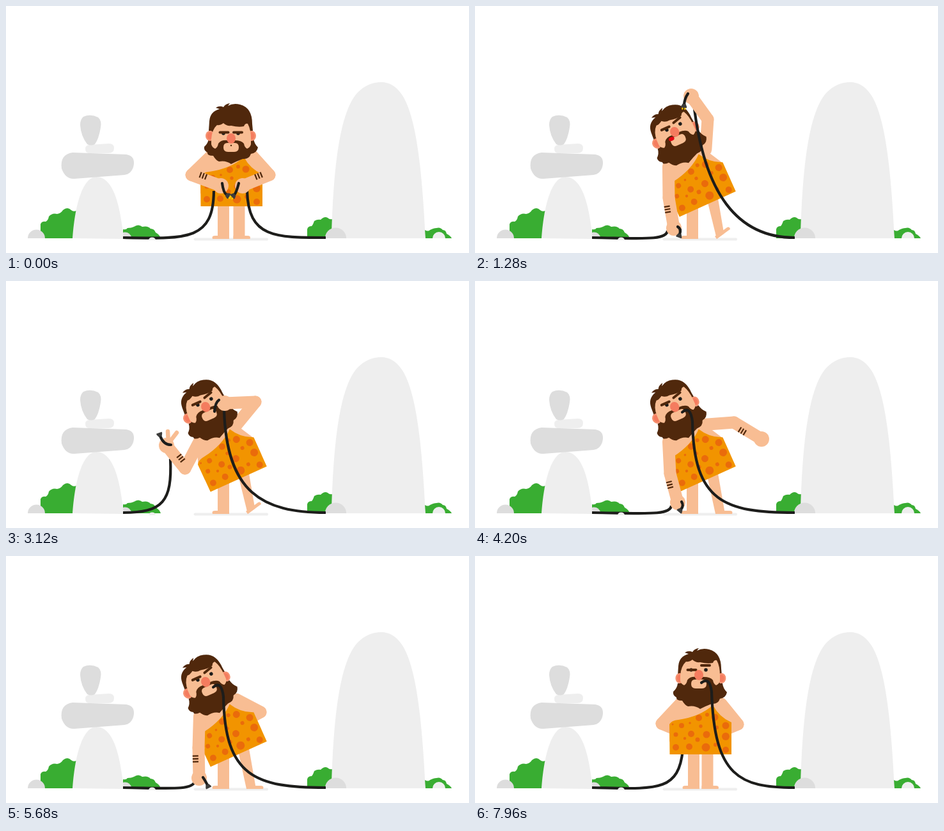
Animation of 724x386 px, one loop 8 s. Source, as an HTML page with a canvas:

```html
<!DOCTYPE html>
<html lang="en">
<head>
<meta charset="utf-8">
<title>Caveman and cables</title>
<style>
  html, body { margin: 0; width: 100%; height: 100%; overflow: hidden; background: #fff; }
  canvas { display: block; }
</style>
</head>
<body>
<canvas id="stage" width="724" height="386"></canvas>
<script>
const ctx = document.getElementById('stage').getContext('2d');
const LOOP = 8000;
const SKIN = '#f8bd93', HAIR = '#50280c', DRESS = '#f29400', SPOT = '#ea6b0b',
      CABLE = '#1d1d1b', NOSE = '#f47c5f', GREEN = '#39ad32', GREY = '#dddddd', PALE = '#eeeeee';

// Scenery
const scenery = [
  [GREEN, 'M54 363V341Q56 336 62 337Q66 335 67 329Q72 323 80 325Q86 324 89 319Q96 313 102 319Q105 322 110 320V363Z'],
  [GREEN, 'M183 363V349Q188 350 190 347Q196 347 200 345Q207 340 213 345Q222 343 226 348Q232 348 234 354Q240 357 242 363Z'],
  [GREEN, 'M471 363V349Q472 344 478 344Q480 342 482 336Q487 333 492 334Q498 328 503 331Q506 334 510 333V363Z'],
  [GREEN, 'M655 363V350Q660 353 663 350Q669 347 673 347Q679 345 683 350Q688 350 689 356Q695 359 697 363Z'],
  [GREY, 'M34 363A13.5 13.5 0 0 1 61 363Z'],
  [GREY, 'M176 363A10 9 0 0 1 196 362Z'],
  [PALE, 'M104 363C107 318 118 268 141 267C170 267 179 318 184 364Z'],
  [PALE, 'M130 217L161 215Q169 215 169 222Q169 230 160 230H130Q124 230 124 223Q124 218 130 217Z'],
  [GREY, 'M104 229L188 232Q201 234 200 247Q198 262 185 264L107 270Q93 271 87 254Q84 232 104 229Z'],
  [GREY, 'M121 173Q132 168 144 174Q150 179 148 190Q145 208 139 216Q133 219 127 216Q117 203 116 186Q116 177 121 173Z'],
  [PALE, 'M509 363C512 250 522 165 550 135Q566 119 587 119Q605 119 618 137C642 170 651 260 656 363Z'],
  [GREY, 'M499 363A16.5 16.5 0 0 1 532 363Z'],
  [PALE, 'M667 363A10 10 0 0 1 687 363Z'],
  [PALE, 'M295 362.5H409Q411 364.5 409 366.5H295Q292 364.5 295 362.5Z']
].map(([color, d]) => [color, new Path2D(d)]);

const shapes = {
  pebble: 'M223 366A5.5 4.5 0 0 1 234 366Z',
  torso: 'M304 264L316 232L330 222H374L384 231L401 262V290H304Z',
  dress: 'M304.5 310L304 263Q307 257 318 256Q352 251 372 233Q382 252 401 260V310Z',
  hair: 'M317 187L318 172Q319 157 334 153L328 151Q334 147 340 150Q343 145 350 144L347 148Q356 143 366 146' +
        'Q385 151 385 176L386 187H383V199L387 199Q388 207 394 213Q392 222 383 223Q380 232 370 231Q362 234 352 239' +
        'Q344 233 333 235Q328 233 324 226Q314 226 315 221Q309 218 310 212Q316 207 317 199L321 199V187Z',
  face: 'M321 187Q322 172 330 165Q334 166 340 162Q345 167 352 166Q364 169 372 167Q374 162 378 163Q383 172 383 187' +
        'V195Q382 200 377 202Q373 200 372 194Q368 189 358 189H346Q336 188 332 194Q331 200 327 202Q322 200 321 195Z',
  mouth: 'M346 193H358Q364 193 364 200Q364 207 357 207H347Q340 207 340 200Q340 193 346 193Z',
  foot: 'M0 0H26Q28 -5 22 -5H0Z',
  plug: 'M-1 -2.5L3 -4.5H5V4.5H3L-1 2.5Z'
};
for (const name in shapes) shapes[name] = new Path2D(shapes[name]);

const spots = [[309,263,1.5],[323,265,4],[336,261,1.8],[350,253,5],[363,248,3],[375,252,5.5],[353,266,2.7],
  [314,279,3.5],[338,278,5],[328,285,2.2],[348,287,3.5],[362,279,5.5],[392,265,5.5],[378,268,3],
  [392,282,6],[314,299,5],[335,298,5],[361,299,6.5],[376,295,3],[392,303,5]];

// Poses. body: x, y, degrees; head: head dy, face dx, face dy; brows: left dy, right dy, right degrees, eye dx;
// legs: left x, right hip x, right heel x, right ankle width, right foot degrees;
// arms: elbow, hand, side of the forearm marks; cables: two controls, end; tails: start, control, end.
const inspect = {
  body: [353, 313, 0], head: [5, 0, 13], brows: [0, 0, 0, 0], legs: [340, 364.5, 355.5, 18, 0],
  armL: [290, 264, 336, 281, 1], cableL: [285, 364, 324, 366, 325, 289], tailL: [338, 277, 340, 292, 345, 295],
  armR: [412, 264, 370, 281, -1], cableR: [420, 362, 379, 362, 377, 289], tailR: [364, 277, 360, 292, 357, 295],
  fingers: [0]
};
const raise = {
  body: [364, 309.5, -24.2], head: [0, 0, 0], brows: [-1.5, -6, -15, 2], legs: [340, 370, 378, 14, -36],
  armL: [303, 300, 311, 347, -1], cableL: [260, 363, 300, 367, 301, 351], tailL: [317, 345, 323, 348, 320, 357],
  armR: [364, 177, 338, 141, -2], cableR: [410, 362, 358, 293, 342, 152], tailR: [333, 137, 328, 144, 327, 154],
  fingers: [0]
};
const bite = { ...raise,
  armR: [390, 189, 342, 191, -2], cableR: [400, 362, 345, 330, 341, 202], tailR: [333, 186, 327, 190, 326, 204]
};
const show = { ...bite,
  armL: [280, 293, 251, 257, -1], cableL: [245, 362, 260, 345, 257, 278], tailL: [258, 256, 246, 256, 241, 242],
  fingers: [1]
};
const release = { ...raise, legs: [340, 370, 376, 15, 0],
  armL: [305, 301, 317, 346, -1], cableL: [265, 363, 306, 367, 307, 351], tailL: [323, 345, 327, 351, 322, 357],
  armR: [404, 197, 450, 147, -1],
  cableR: [390, 362, 342, 345, 340, 220], tailR: [340, 220, 337, 194, 324, 205]
};
const swing = { ...release, armR: [405, 221, 448, 247, -1] };
const lean = { ...swing,
  armL: [301, 300, 302, 347, -1], cableL: [260, 363, 290, 366, 295, 353], tailL: [308, 346, 311, 350, 315, 358],
  armR: [398, 244, 365, 262, -2]
};
const stand = {
  body: [353, 310, 0], head: [0, 0, 0], brows: [0, 0, 0, 0], legs: [342, 363.5, 354.5, 18, 0],
  armL: [292, 262, 335, 280, -2], cableL: [283, 364, 318, 370, 325, 303], tailL: [335, 280, 340, 284, 340, 288],
  armR: [411, 263, 370, 280, -2],
  cableR: [415, 362, 375, 345, 371, 212], tailR: [371, 212, 369, 188, 357, 197],
  fingers: [0]
};
const squint = { ...stand,
  head: [0, -2, 0], brows: [1.5, -5.5, 0, 0],
  cableR: [414, 362, 374, 345, 370, 212], tailR: [370, 212, 367, 188, 354, 198]
};

const timeline = [
  [0, inspect], [260, inspect], [760, raise], [1480, raise], [1860, bite], [2560, bite], [2920, show],
  [3440, show], [3820, release], [4200, swing], [4520, lean], [5920, lean], [6340, stand],
  [7080, stand], [7320, squint], [LOOP, squint]
];

const ease = k => k < .5 ? 4 * k ** 3 : 1 - (2 - 2 * k) ** 3 / 2;

function poseAt(time) {
  const next = timeline.findIndex(key => key[0] > time);
  const [t0, from] = timeline[next - 1], [t1, to] = timeline[next];
  const k = ease((time - t0) / (t1 - t0)), pose = {};
  for (const part in from) pose[part] = from[part].map((v, i) => v + (to[part][i] - v) * k);
  return pose;
}

// Drawing helpers
const radians = degrees => degrees * Math.PI / 180;

function fill(path, color) { ctx.fillStyle = color; ctx.fill(path); }

function oval(x, y, rx, ry, color) {
  ctx.fillStyle = color;
  ctx.beginPath();
  ctx.ellipse(x, y, rx, ry, 0, 0, 7);
  ctx.fill();
}

function line(points, width, color, cap = 'round') {
  ctx.strokeStyle = color;
  ctx.lineWidth = width;
  ctx.lineCap = cap;
  ctx.beginPath();
  points.forEach(([x, y]) => ctx.lineTo(x, y));
  ctx.stroke();
}

function placed(x, y, angle, draw) {
  ctx.save();
  ctx.translate(x, y);
  ctx.rotate(angle);
  draw();
  ctx.restore();
}

function onBody([x, y, degrees], draw) {
  placed(x, y, radians(degrees), () => { ctx.translate(-353, -310); draw(); });
}

function shoulder([x, y, degrees], side) {
  const a = radians(degrees), px = side * 32, py = -79;
  return [x + px * Math.cos(a) - py * Math.sin(a), y + px * Math.sin(a) + py * Math.cos(a)];
}

function drawLegs([leftX, hipX, heelX, ankle, footDegrees]) {
  const a = radians(footDegrees);
  ctx.fillStyle = SKIN;
  ctx.fillRect(leftX - 9, 290, 18, 74);
  placed(leftX + 9, 364, 0, () => { ctx.scale(-1, 1); ctx.fill(shapes.foot); });
  ctx.beginPath();
  ctx.moveTo(hipX - 9, 295);
  ctx.lineTo(hipX + 9, 295);
  ctx.lineTo(heelX + ankle * Math.cos(a), 364 + ankle * Math.sin(a));
  ctx.lineTo(heelX, 364);
  ctx.fill();
  placed(heelX, 364, a, () => ctx.fill(shapes.foot));
}

function drawForearm([ex, ey, hx, hy, side]) {
  line([[ex, ey], [hx, hy]], 19, SKIN);
  oval(hx, hy, 12, 12, SKIN);
  if (side < -1.2) return;
  placed(ex + (hx - ex) * .36, ey + (hy - ey) * .36, Math.atan2(hy - ey, hx - ex), () => {
    for (const x of [-4.5, 0, 4.5]) line([[x, -side * 5 - 4.5], [x, -side * 5 + 4.5]], 2.2, HAIR, 'butt');
  });
}

function drawUpperArm(from, [ex, ey]) { line([from, [ex, ey]], 19, SKIN); }

function drawFingers([hx, hy], amount) {
  if (amount < .02) return;
  for (const [dx, dy] of [[2, -22], [16, -20]])
    line([[hx + 3, hy - 3], [hx + dx * amount, hy + dy * amount]], 6.5, SKIN);
}

function drawCable(startX, [ax, ay, bx, by, x, y]) {
  ctx.strokeStyle = CABLE;
  ctx.lineWidth = 4.2;
  ctx.lineCap = 'butt';
  ctx.beginPath();
  ctx.moveTo(startX, 362);
  ctx.bezierCurveTo(ax, ay, bx, by, x, y);
  ctx.stroke();
}

function drawTail([x, y, cx, cy, ex, ey], plug, prongs) {
  ctx.strokeStyle = CABLE;
  ctx.lineWidth = 4.2;
  ctx.lineCap = 'round';
  ctx.beginPath();
  ctx.moveTo(x, y);
  ctx.quadraticCurveTo(cx, cy, ex, ey);
  ctx.stroke();
  if (!plug) return;
  placed(ex, ey, Math.atan2(ey - cy, ex - cx), () => {
    if (prongs) for (const side of [-2, 2]) line([[4, side], [8, side]], 2, '#ffd500', 'butt');
    fill(shapes.plug, '#3c3c3b');
  });
}

function drawHead({ head: [dy, faceX, faceY], brows: [leftDy, rightDy, tilt, eyeX] }, time) {
  ctx.translate(0, dy);
  fill(shapes.hair, HAIR);
  for (const x of [319, 384]) {
    oval(x - faceX * .7, 191 + faceY * .3, 7, 8, '#f6906f');
    oval(x - faceX * .7, 191 + faceY * .3, 4.5, 5.5, NOSE);
  }
  ctx.translate(0, faceY);
  fill(shapes.face, SKIN);
  ctx.translate(faceX, 0);
  fill(shapes.mouth, SKIN);
  if (time < 400) oval(352, 197, 1.2, 1.2, HAIR);
  if (time > 600 && time < 1700) oval(343, 194, 4.5, 3, '#e30613');
  for (const x of [340, 363]) oval(x + eyeX, 178, 2.8, 2.8, CABLE);
  line([[334.5, 176.5 + leftDy], [347.5, 176.5 + leftDy]], 4, HAIR);
  placed(362.5, 176.5 + rightDy, radians(tilt), () => line([[-6.5, 0], [6.5, 0]], 4, HAIR));
  oval(352, 186, 7, 8, NOSE);
}

function draw(time) {
  const pose = poseAt(time);
  const { body, armL, armR, cableL, cableR } = pose;
  const leftBehind = time > 6130, rightBehind = time > 3820;
  const leftArm = () => {
    drawCable(183, cableL);
    drawUpperArm(shoulder(body, -1), armL);
    drawForearm(armL);
    drawFingers(armL.slice(2), pose.fingers[0]);
    drawTail(pose.tailL, true, time < 500);
  };

  ctx.clearRect(0, 0, 724, 386);
  for (const [color, path] of scenery) fill(path, color);
  drawLegs(pose.legs);
  if (leftBehind) leftArm();
  drawUpperArm(shoulder(body, 1), armR);
  if (rightBehind) drawForearm(armR);
  onBody(body, () => {
    fill(shapes.torso, SKIN);
    fill(shapes.dress, DRESS);
    ctx.clip(shapes.dress);
    for (const [x, y, r] of spots) oval(x, y, r, r, SPOT);
  });
  if (!leftBehind) leftArm();
  onBody(body, () => drawHead(pose, time));
  drawCable(500, cableR);
  if (!rightBehind) drawForearm(armR);
  drawTail(pose.tailR, time < 1800, true);
  fill(shapes.pebble, PALE);
}

function frame(now) {
  draw(now % LOOP);
  requestAnimationFrame(frame);
}
draw(0);
requestAnimationFrame(frame);
</script>
</body>
</html>
```
